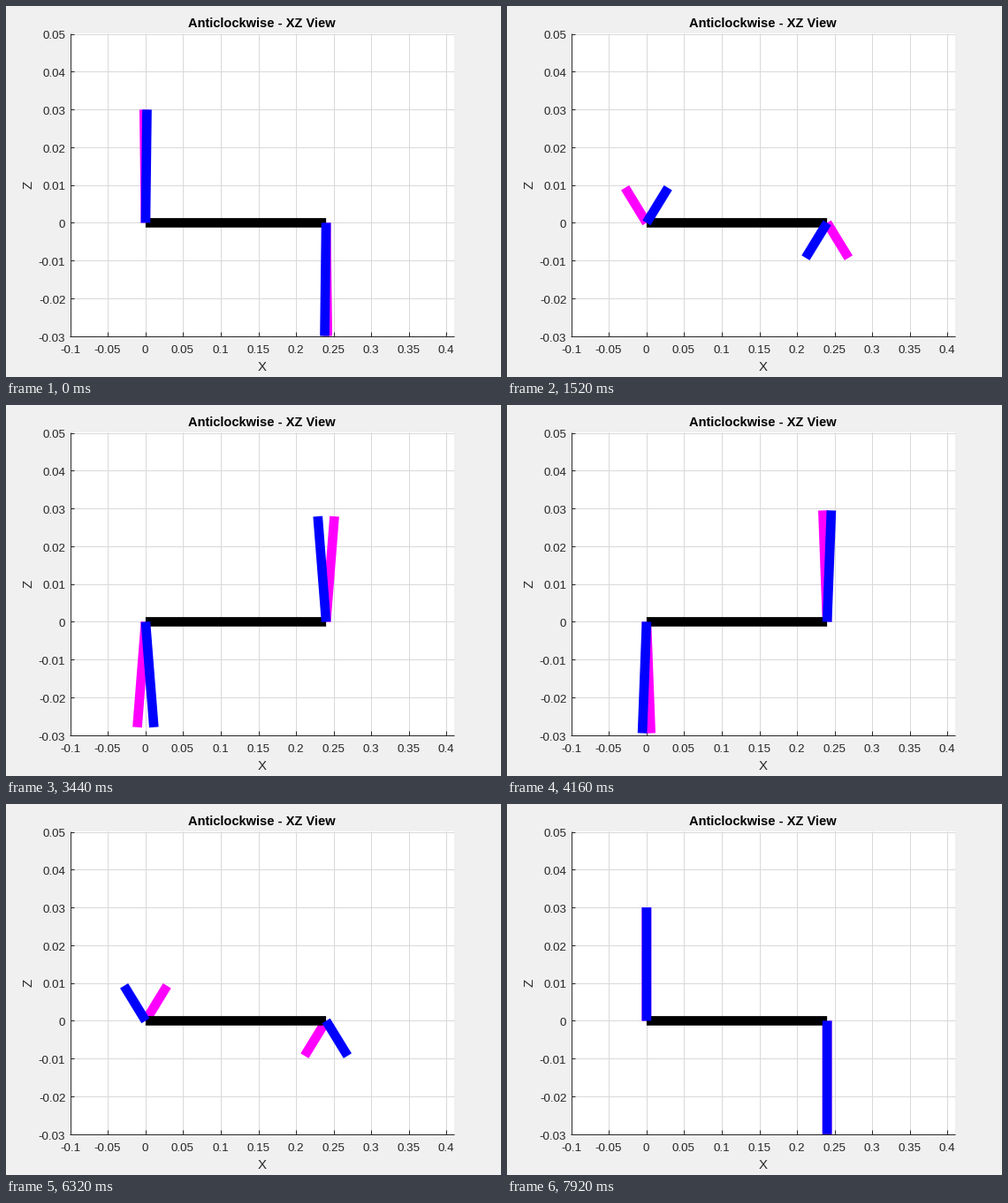
A matplotlib script that plays this animation: 560 by 420 pixels, repeating every 8000 ms.

```python
import numpy as np
import matplotlib.pyplot as plt
from matplotlib.animation import FuncAnimation
from matplotlib.patches import Rectangle

W, H, DPI = 560, 420, 100
FRAMES, INTERVAL = 100, 80
LEFT, RIGHT, TOP, BOTTOM = 72.8, 506.8, 31.5, 373.8
XMIN, XMAX, ZMIN, ZMAX = -0.1, 0.41, -0.03, 0.05
ARM, BAR = 0.03, 0.24
PT = 72 / DPI  # points per pixel
INK, GRID = "#262626", "#d9d9d9"

plt.rcParams["font.family"] = "Liberation Sans"
fig = plt.figure(figsize=(W / DPI, H / DPI), dpi=DPI, facecolor="#f0f0f0")
ax = fig.add_axes([0, 0, 1, 1])
ax.set_xlim(0, W)
ax.set_ylim(H, 0)
ax.axis("off")


def px(x):
    return LEFT + (x - XMIN) / (XMAX - XMIN) * (RIGHT - LEFT)


def pz(z):
    return BOTTOM - (z - ZMIN) / (ZMAX - ZMIN) * (BOTTOM - TOP)


def snap(p):
    """Centre of the pixel that a hairline at p falls on."""
    return np.floor(p - 0.5 + 1e-6) + 0.5


def thin(x0, y0, x1, y1, color, z):
    ax.plot([x0, x1], [y0, y1], color=color, lw=PT, zorder=z,
            solid_capstyle="butt")


def label(x, y, s, size=13.33, color=INK, ha="center", **kw):
    ax.text(x, y, s, fontsize=size * PT, color=color, ha=ha, va="baseline",
            zorder=9, **kw)


def thick(color, z):
    line, = ax.plot([], [], color=color, lw=10.67 * PT, zorder=z,
                    solid_capstyle="butt", snap=False)
    line.set_clip_path(panel)
    return line


def tick_text(v):
    return f"{v:.2f}".rstrip("0").rstrip(".") if abs(v) > 1e-6 else "0"


panel = Rectangle((72, 31), 435, 343, fc="white", ec="none", zorder=1)
ax.add_patch(panel)

x_axis, z_axis = snap(BOTTOM), snap(LEFT)

for v in np.arange(11) * 0.05 - 0.1:
    x = snap(px(v))
    thin(x, 31, x, x_axis, GRID, 2)
    thin(x, x_axis - 4.5, x, x_axis, INK, 3)
    label(x, 393, tick_text(v))

for v in np.arange(9) * 0.01 - 0.03:
    y = snap(pz(v))
    thin(z_axis, y, 507, y, GRID, 2)
    thin(z_axis, y, z_axis + 4.5, y, INK, 3)
    label(67.3, pz(v) + 5.8, tick_text(v), ha="right")

thin(z_axis, 31, z_axis, x_axis + 0.5, INK, 3)
thin(z_axis - 0.5, x_axis, 507, x_axis, INK, 3)

label(289.8, 24, "Anticlockwise - XZ View", 14.67, "black", weight="bold")
label(289.5, 413, "X", 15)
label(29, 202, "Z", 15, rotation=90, rotation_mode="anchor")

far = [thick("magenta", 4) for _ in range(2)]
thick("black", 5).set_data([px(0), px(BAR)], [pz(0), pz(0)])
near = [thick("blue", 6) for _ in range(2)]


def set_arms(arms, dx, dz):
    """Place a pair of opposite arms at the two ends of the bar."""
    for line, x, s in zip(arms, (0, BAR), (1, -1)):
        line.set_data([px(x), px(x + s * dx)], [pz(0), pz(s * dz)])


def update(i):
    a = 2 * np.pi * (i + 1) / FRAMES
    dx, dz = ARM * np.sin(a), ARM * np.cos(a)
    set_arms(far, -dx, dz)
    set_arms(near, dx, dz)
    return far + near


anim = FuncAnimation(fig, update, frames=FRAMES, interval=INTERVAL,
                     repeat=True, repeat_delay=0)
plt.show()
```
